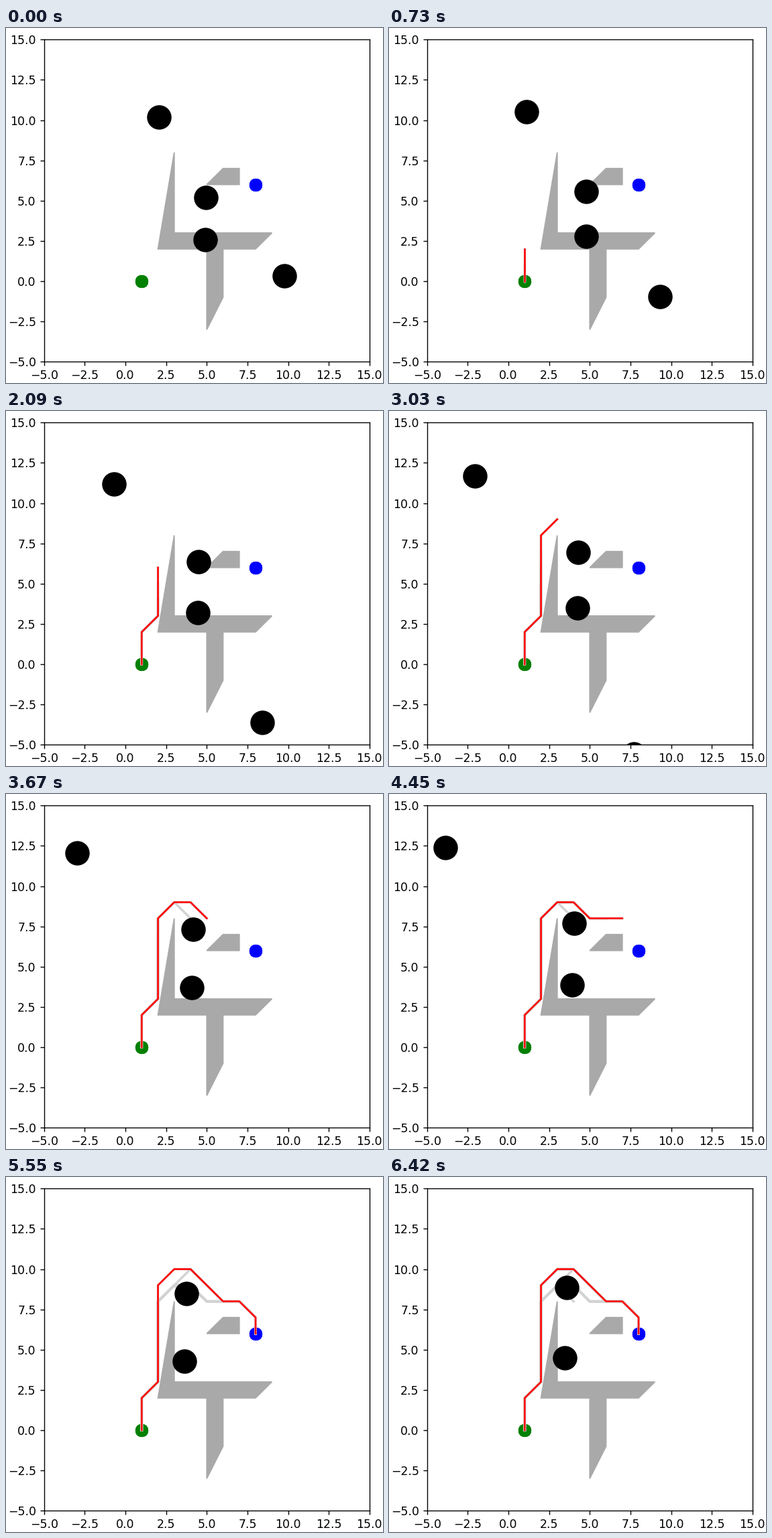
These frames come from a looping animation (562 by 530 pixels, 6.51 s). A matplotlib script:

```python
import matplotlib.pyplot as plt
import numpy as np
from matplotlib.animation import FuncAnimation

W, H, DPI = 562, 530, 125
LOOP, TICK = 6510, 30

# Planner pace: steps reached at these times (ms), even in between.
PACE_TIMES = [0, 3000, 5370, 5910, 6360]
PACE_STEPS = [0, 9, 17, 18, 19]

START, GOAL = (1, 0), (8, 6)
WALLS = [
    [(2, 2), (3, 8), (3, 3), (9, 3), (8, 2), (6, 2), (6, -1), (5, -3), (5, 2)],
    [(5, 6), (6, 7), (7, 7), (7, 6)],
]
BALLS = np.array([(2.5, 10), (5, 5), (5, 2.5), (10, 1)])
VELOCITY = np.array([(-.457, .17), (-.07, .193), (-.077, .099), (-.23, -.658)])

# Ways around the rising ball, keyed by the step that starts using them.
DETOURS = {
    0: [(2, 8), (3, 9), (4, 8)],
    11: [(2, 8), (3, 9), (4, 9), (5, 8)],
    16: [(2, 8), (4, 10)],
    17: [(2, 9), (3, 10), (4, 10)],
}


def walk(corners):
    """Unit grid moves, straight or diagonal, through the corners."""
    points = [corners[0]]
    for a, b in zip(corners, corners[1:]):
        moves = max(abs(b[0] - a[0]), abs(b[1] - a[1]))
        points += list(np.linspace(a, b, moves + 1)[1:])
    return points


ROUTES = {
    first: walk([START, (1, 2), (2, 3), *detour, (6, 8), (7, 8), (8, 7), GOAL])
    for first, detour in DETOURS.items()
}


def route(step):
    """Path travelled after the given number of moves."""
    current = max(first for first in ROUTES if first <= step)
    return ROUTES[current][:step + 1] if step else []


def history(step):
    """All routes up to this step, separated by gaps."""
    points = []
    for k in range(1, step + 1):
        points += route(k) + [(np.nan, np.nan)]
    return points


def set_points(line, points):
    line.set_data(*np.reshape(points, (-1, 2)).T)


def endpoint(position, color):
    # Stacked copies give the marker a hard edge.
    ax.plot(*zip(*[position] * 10), "o", color=color, markersize=10)


fig = plt.figure(figsize=(W / DPI, H / DPI), dpi=DPI, facecolor="white")
ax = fig.add_axes([56.8 / W, 31.7 / H, 485 / W, 481 / H])
ax.set(xlim=(-5, 15), ylim=(-5, 15))
ticks = np.arange(-5, 15.1, 2.5)
ax.set_xticks(ticks)
ax.set_yticks(ticks)

for wall in WALLS:
    ax.fill(*zip(*wall), color="darkgray")
endpoint(START, "green")
endpoint(GOAL, "blue")
trail, = ax.plot([], [], color="lightgray", linewidth=2)
path, = ax.plot([], [], color="red", linewidth=1.5)
balls, = ax.plot([], [], "o", color="black", markersize=20)


def update(frame):
    step = int(np.interp(frame * TICK, PACE_TIMES, PACE_STEPS))
    set_points(trail, history(step))
    set_points(path, route(step))
    set_points(balls, BALLS + VELOCITY * (step + 1))
    return trail, path, balls


anim = FuncAnimation(fig, update, frames=LOOP // TICK, interval=TICK,
                     init_func=lambda: update(0), repeat=True, repeat_delay=0)
plt.show()
```
